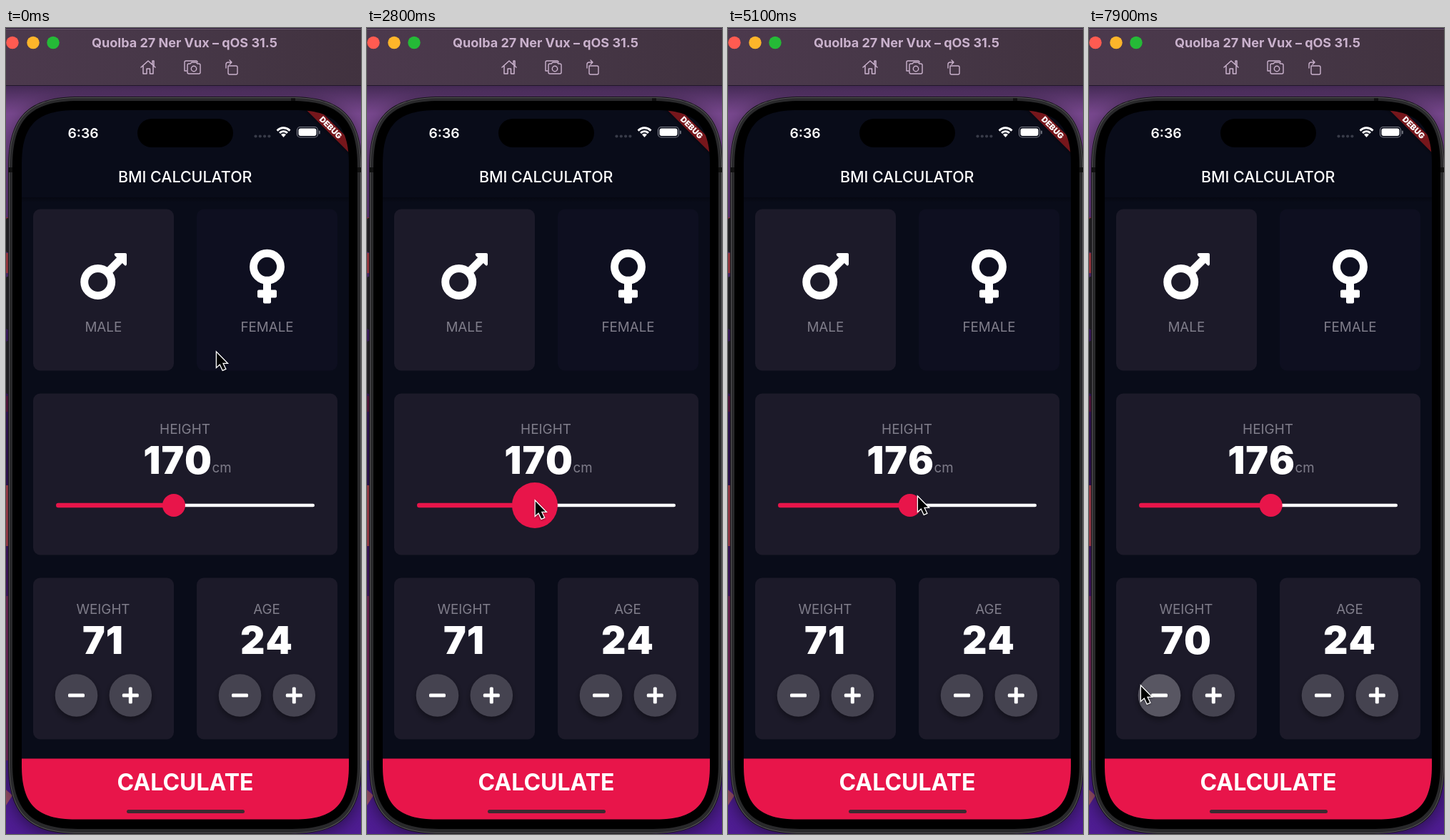
An HTML page with a canvas that plays this animation: 497 px wide and 1128 px high, repeating every 8000 ms.

```html
<!DOCTYPE html>
<html lang="en">
<head>
<meta charset="utf-8">
<title>BMI Calculator</title>
<style>
  html, body { margin: 0; width: 100%; height: 100%; overflow: hidden; background: #2a1640; }
  canvas { display: block; width: 497px; height: 1128px; }
</style>
</head>
<body>
<canvas id="stage" width="497" height="1128"></canvas>
<script>
const ctx = document.getElementById('stage').getContext('2d');
const LOOP = 8000, STEP = 100;
const PINK = '#e8154a', WHITE = '#fff', CARD = '#1c1a29', MUTED = '#7f7d8a', KEY = '#454350';

// Rows are [ms, value, ...]; values ease between neighbouring rows.
const pointerPath = [
  [0, 294, 453], [900, 294, 453], [1500, 250, 535], [1900, 219, 589], [2500, 234, 661],
  [2700, 234, 661], [3600, 258, 661], [4500, 253, 661], [4700, 253, 661], [5100, 265, 655],
  [5700, 184, 939], [6700, 184, 939], [7200, 72, 920], [8000, 72, 920]
];
const heightPath = [[0, 170], [2700, 170], [3600, 178], [4500, 176], [8000, 176]];
const thumbPath = [[0, 16], [2600, 16], [2800, 32], [4600, 32], [4800, 16], [8000, 16]];
const plusClicks = [5900, 6300, 6600];
const minusClicks = [7400, 7550, 7700, 7850];

function sample(path, t) {
  let i = 1;
  while (i < path.length - 1 && path[i][0] < t) i++;
  const a = path[i - 1], b = path[i];
  const p = Math.min(1, (t - a[0]) / (b[0] - a[0]));
  const e = p * p * (3 - 2 * p);
  return a.slice(1).map((v, k) => v + (b[k + 1] - v) * e);
}

function box(x, y, w, h, r, fill) {
  ctx.beginPath();
  ctx.roundRect(x, y, w, h, r);
  ctx.fillStyle = fill;
  ctx.fill();
}

// Rounded rectangle whose corners blend gradually into the sides.
function smoothBox(x, y, w, h, r) {
  const e = r * 1.28, c = r * .355, x2 = x + w, y2 = y + h;
  const p = new Path2D();
  p.moveTo(x + e, y);
  p.lineTo(x2 - e, y);
  p.bezierCurveTo(x2 - c, y, x2, y + c, x2, y + e);
  p.lineTo(x2, y2 - e);
  p.bezierCurveTo(x2, y2 - c, x2 - c, y2, x2 - e, y2);
  p.lineTo(x + e, y2);
  p.bezierCurveTo(x + c, y2, x, y2 - c, x, y2 - e);
  p.lineTo(x, y + e);
  p.bezierCurveTo(x, y + c, x + c, y, x + e, y);
  return p;
}

function fillPath(path, fill) {
  ctx.fillStyle = fill;
  ctx.fill(path);
}

function disc(x, y, r, fill) {
  ctx.beginPath();
  ctx.arc(x, y, r, 0, Math.PI * 2);
  ctx.fillStyle = fill;
  ctx.fill();
}

function stroke(path, color, width) {
  ctx.strokeStyle = color;
  ctx.lineWidth = width;
  ctx.stroke(new Path2D(path));
}

function text(s, x, y, size, weight, color = WHITE, align = 'center') {
  ctx.font = `${weight} ${size}px Inter, sans-serif`;
  ctx.textAlign = align;
  ctx.fillStyle = color;
  ctx.fillText(s, x, y);
}

function bigNumber(value, x, y, align) {
  ctx.fontKerning = 'none';
  ctx.letterSpacing = '1px';
  text(value, x, y, 53.3, 900, WHITE, align);
  ctx.letterSpacing = '0px';
  ctx.fontKerning = 'auto';
}

function gradient(x0, y0, x1, y1, ...colors) {
  const g = ctx.createLinearGradient(x0, y0, x1, y1);
  colors.forEach((c, i) => g.addColorStop(i / (colors.length - 1), c));
  return g;
}

function desktop() {
  ctx.fillStyle = gradient(0, 80, 0, 1128, '#7b4a90', '#6d3f88', '#45206c', '#35155c', '#4b1a6d', '#48208c', '#4f1c93');
  ctx.fillRect(0, 0, 497, 1128);
  ctx.fillStyle = gradient(0, 80, 0, 120, 'rgba(38,24,52,.65)', 'rgba(38,24,52,0)');
  ctx.fillRect(0, 80, 497, 40);
  const patches = [[265, 13, '#a8384d'], [315, 28, '#b5434c'], [515, 22, '#611a48'], [640, 85, '#b34655'], [795, 230, '#7d2c62']];
  for (const [y, h, c] of patches) {
    ctx.fillStyle = c;
    ctx.fillRect(0, y, 3, h);
  }
  fillPath(new Path2D('M0 1066L9 1074L0 1088Z'), '#985069');
}

function titleBar() {
  ctx.fillStyle = gradient(0, 0, 497, 0, '#4c394d', '#463747', '#41323f');
  ctx.fillRect(0, 1, 497, 79);
  ctx.fillStyle = '#2a1838';
  ctx.fillRect(0, 0, 497, 1);
  ctx.fillStyle = '#6a576b';
  ctx.fillRect(0, 1, 497, 1);
  ctx.fillStyle = '#21172a';
  ctx.fillRect(0, 80, 497, 1);
  disc(9, 20.5, 8.7, '#ff5b51');
  disc(38, 20.5, 8.7, '#fdb52a');
  disc(66, 20.5, 8.7, '#25ba37');

  const ink = '#cab2cd';
  text('Quolba 27 Ner Vux – qOS 31.5', 250, 26.5, 18, 700, ink);
  ctx.lineJoin = ctx.lineCap = 'round';
  stroke('M189 55L199 46L209 55M192 53V64H197V57H201.500V64H206V53M205 51V46H207V53', ink, 1.5);
  stroke('M253 60H250V48Q250 46 252 46H266Q268 46 268 48', ink, 1.4);
  stroke('M254 52Q254 50 256 50H258L260 48H266L268 50H270Q272 50 272 52V62Q272 64 270 64H256Q254 64 254 62Z', ink, 1.4);
  stroke('M259.300 57a3.700 3.700 0 1 0 7.400 0a3.700 3.700 0 1 0 -7.400 0', ink, 1.4);
  stroke('M311 53H322Q324 53 324 55V63Q324 65 322 65H313Q311 65 311 63ZM308 56V51Q308 48 311 48H316M313 45L316 48L313 51', ink, 1.4);
}

function phoneBody() {
  for (const [y, h] of [[266, 48], [348, 74], [438, 74]]) box(0, y, 5, h, 2, '#29272b');
  ctx.save();
  ctx.beginPath();
  ctx.rect(0, 81, 497, 1047);
  ctx.clip();
  ctx.shadowColor = 'rgba(0,0,0,.45)';
  ctx.shadowBlur = 22;
  ctx.shadowOffsetY = 6;
  fillPath(smoothBox(3, 96, 495, 1032, 78), '#121114');
  ctx.restore();
  fillPath(smoothBox(4, 97, 493, 1030, 77), '#565458');
  fillPath(smoothBox(5, 98, 491, 1028, 76), '#29292b');
  ctx.fillStyle = '#111';
  ctx.fillRect(4, 195, 5, 7);
  ctx.fillRect(492, 195, 5, 7);
  ctx.fillRect(399, 98, 6, 5);
  fillPath(smoothBox(9, 102, 483, 1019, 72), '#000');
}

function statusBar() {
  text('6:36', 108, 153.5, 19.3, 600);
  box(184, 127, 134, 40, 20, '#000');
  for (let i = 0; i < 4; i++) disc(349.5 + i * 6.3, 151.5, 2.1, '#383b48');

  ctx.lineCap = 'butt';
  for (const r of [12.2, 7.4]) {
    ctx.beginPath();
    ctx.arc(388.5, 152, r, -Math.PI * .76, -Math.PI * .24);
    ctx.strokeStyle = WHITE;
    ctx.lineWidth = 2.9;
    ctx.stroke();
  }
  fillPath(new Path2D('M388.500 153L385 149Q388.500 146.500 392 149Z'), WHITE);

  ctx.beginPath();
  ctx.roundRect(407.5, 138.5, 29, 14.5, 4.5);
  ctx.strokeStyle = '#777984';
  ctx.lineWidth = 1.2;
  ctx.stroke();
  box(409.5, 140.5, 25, 10.5, 3, WHITE);
  box(438, 143.5, 1.8, 5, 1, '#777984');
}

function debugBanner() {
  ctx.save();
  ctx.translate(454.5, 139.5);
  ctx.rotate(Math.PI / 4);
  ctx.shadowColor = 'rgba(0,0,0,.5)';
  ctx.shadowBlur = 6;
  ctx.fillStyle = '#76161b';
  ctx.fillRect(-60, -6.5, 120, 13);
  ctx.shadowBlur = 0;
  text('DEBUG', 0, 3.8, 11.2, 900);
  ctx.restore();
}

function genderIcons() {
  ctx.lineCap = 'butt';
  const ring = (x, y) => {
    ctx.beginPath();
    ctx.arc(x, y, 19, 0, Math.PI * 2);
    ctx.strokeStyle = WHITE;
    ctx.lineWidth = 10.9;
    ctx.stroke();
  };
  ring(128.7, 355.5);
  stroke('M142.500 341.700L160 324.200', WHITE, 10.9);
  fillPath(new Path2D('M154 315H167Q169 315 169 317V330.500Q168.500 334 165.700 331.800L152.300 318.400Q150.500 315.500 154 315Z'), WHITE);
  ring(365.5, 334.3);
  box(360, 355, 11, 30.5, 2, WHITE);
  box(352, 366.5, 27, 11, 2, WHITE);
}

function roundKey(x, plus, glow) {
  ctx.save();
  ctx.shadowColor = 'rgba(0,0,0,.4)';
  ctx.shadowBlur = 9;
  ctx.shadowOffsetY = 4;
  disc(x, 934, 29.8, KEY);
  ctx.restore();
  if (glow) disc(x, 934, 29.8, `rgba(255,255,255,${glow})`);
  box(x - 11.5, 931.5, 23, 5, 1.5, WHITE);
  if (plus) box(x - 2.5, 922.5, 5, 23, 1.5, WHITE);
}

function counter(label, value, x, minusGlow = 0, plusGlow = 0) {
  box(x, 769.5, 197, 226, 10, CARD);
  text(label, x + 98, 820, 18.8, 400, MUTED);
  bigNumber(value, x + 98, 876, 'center');
  roundKey(x + 60.5, false, minusGlow);
  roundKey(x + 136.3, true, plusGlow);
}

function heightCard(height, thumbRadius) {
  box(38, 511.5, 426, 226, 10, CARD);
  text('HEIGHT', 250.5, 568, 18.9, 400, MUTED);
  bigNumber(height, 289, 624, 'right');
  text('cm', 288.5, 622, 18.7, 400, MUTED, 'left');
  const x = 70.4 + (height - 120) * 362 / 110;
  box(x, 665.8, 432 - x, 4.4, 2.2, WHITE);
  box(70, 664.8, x - 70, 6.4, 3.2, PINK);
  disc(x, 668, thumbRadius, PINK);
}

function pointer(x, y) {
  ctx.save();
  ctx.translate(x, y);
  ctx.shadowColor = 'rgba(0,0,0,.4)';
  ctx.shadowBlur = 3;
  ctx.shadowOffsetY = 1;
  const arrow = new Path2D('M1 1.500V21L5.500 17L9.500 25.500L13 24L9 15.800H15Z');
  ctx.lineJoin = 'miter';
  ctx.strokeStyle = WHITE;
  ctx.lineWidth = 2.6;
  ctx.stroke(arrow);
  ctx.shadowColor = 'transparent';
  fillPath(arrow, '#000');
  ctx.restore();
}

const clicked = (clicks, t) => clicks.filter(c => c <= t).length;

function keyGlow(clicks, t) {
  const last = clicks.filter(c => c <= t).pop();
  return last === undefined ? 0 : .1 * Math.max(0, 1 - Math.max(0, t - last - 100) / 250);
}

function app(t) {
  ctx.save();
  ctx.clip(smoothBox(22, 115, 458, 992.5, 59));
  ctx.fillStyle = '#090c19';
  ctx.fillRect(22, 115, 458, 993);
  ctx.fillStyle = gradient(0, 237, 0, 244, '#060812', '#090c19');
  ctx.fillRect(22, 237, 458, 7);

  statusBar();
  text('BMI CALCULATOR', 250.7, 215.5, 21.4, 500);
  box(38, 253.5, 197, 226, 10, CARD);
  box(267, 253.5, 197, 226, 10, '#0e0f20');
  genderIcons();
  text('MALE', 136.3, 424.5, 18.8, 400, MUTED);
  text('FEMALE', 365.5, 424.5, 18.8, 400, MUTED);

  heightCard(Math.round(sample(heightPath, t)[0]), sample(thumbPath, t)[0]);
  const weight = 71 + clicked(plusClicks, t) - clicked(minusClicks, t);
  counter('WEIGHT', weight, 38, keyGlow(minusClicks, t), keyGlow(plusClicks, t));
  counter('AGE', 24, 267);

  ctx.fillStyle = PINK;
  ctx.fillRect(22, 1022.5, 458, 86);
  text('CALCULATE', 251, 1066.5, 32, 700);
  box(169, 1094, 165, 5, 2.5, '#3c2a31');
  debugBanner();
  ctx.restore();
}

function render(now) {
  const t = Math.floor(now % LOOP / STEP) * STEP;
  desktop();
  titleBar();
  phoneBody();
  app(t);
  pointer(...sample(pointerPath, t));
}

function tick() {
  render(performance.now());
  requestAnimationFrame(tick);
}
tick();
</script>
</body>
</html>
```
